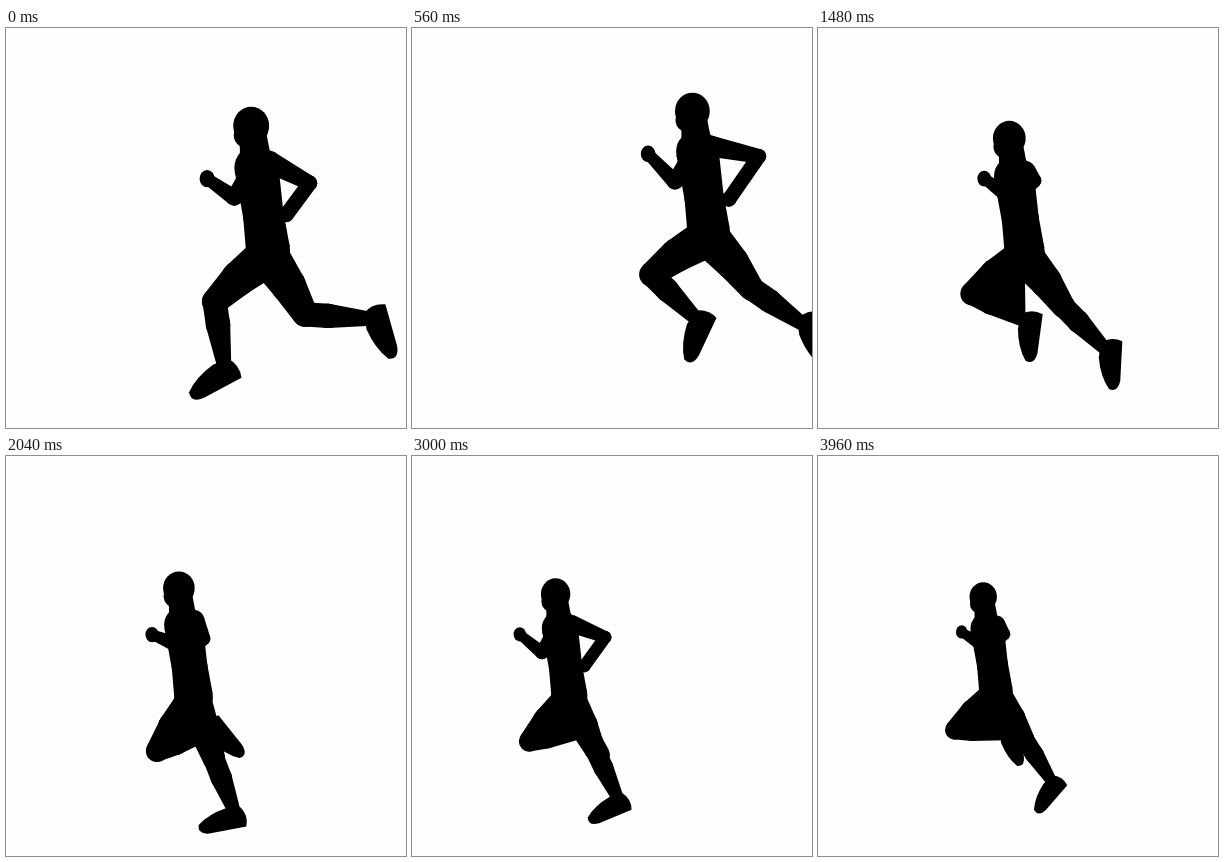
Recreate the animation shown at these times as an HTML page with a canvas. Size 400x400 px, loop 4000 ms.

```html
<!DOCTYPE html>
<html lang="en">
<head>
<meta charset="utf-8">
<title>Runner</title>
<style>
  html, body { margin: 0; width: 100%; height: 100%; overflow: hidden; background: #fefefc; }
  canvas { display: block; width: 100vw; height: 100vh; }
</style>
</head>
<body>
<canvas id="stage" width="400" height="400"></canvas>
<script>
const ctx = document.getElementById('stage').getContext('2d');
const LOOP = 4000, TICK = 40, STEP = 313;
const THIGH = 64, SHIN = 57;
const { sin, cos, PI } = Math;
const rad = deg => deg * PI / 180;
const bump = (u, mid, width) => Math.exp(-(((u - mid) / width) ** 2));

// Handheld camera: turning points of the hip as [time, x, mean y]
const sway = [
  [0, 262, 235], [600, 297, 211], [1300, 152, 225], [1640, 252, 228],
  [2300, 155, 229], [2540, 268, 235], [3200, 128, 230], [3960, 178, 232]
];

function hipAt(t) {
  const i = Math.max(1, sway.findIndex(k => k[0] >= t));
  const [t0, x0, y0] = sway[i - 1], [t1, x1, y1] = sway[i];
  const e = (1 - cos(PI * (t - t0) / (t1 - t0))) / 2;
  return [x0 + (x1 - x0) * e, y0 + (y1 - y0) * e];
}

// Angles in degrees from straight down, forward positive.
// u runs from 0 (landing) over 1 (the other foot lands) to 2.
const thighAngle = u => 8 + 45 * cos(PI * (u - 1.68));

function shinAngle(u) {
  const a = PI * u;
  return -56.5 + 47.3 * cos(a) + 21.6 * sin(a) + 2.7 * cos(2 * a) -
    9.7 * sin(2 * a) - 4 * cos(3 * a) - 6.4 * sin(3 * a);
}

// Flat while the foot carries weight, pointed at push-off
const footAngle = u =>
  18 - shinAngle(u) - 30 * bump(u, 0.38, 0.13) + 30 * bump(u, 0.63, 0.1);

const swing = ([x, y], length, deg) =>
  [x - length * sin(rad(deg)), y + length * cos(rad(deg))];
const mix = (a, b, k) => a.map((v, i) => v + (b[i] - v) * k);

function disc([x, y], rx, ry = rx) {
  ctx.beginPath();
  ctx.ellipse(x, y, rx, ry, 0, 0, 2 * PI);
  ctx.fill();
}

// Tapered limb between two round ends
function limb(p, r1, q, r2) {
  disc(p, r1);
  disc(q, r2);
  const dx = q[0] - p[0], dy = q[1] - p[1], d = Math.hypot(dx, dy);
  if (d <= Math.abs(r1 - r2)) return;
  const a = Math.atan2(dy, dx), b = Math.acos((r1 - r2) / d);
  const at = ([x, y], r, g) => ctx.lineTo(x + r * cos(g), y + r * sin(g));
  ctx.beginPath();
  at(p, r1, a + b);
  at(q, r2, a + b);
  at(q, r2, a - b);
  at(p, r1, a - b);
  ctx.fill();
}

function drawFoot(ankle, deg) {
  ctx.save();
  ctx.translate(...ankle);
  ctx.scale(-1, 1);
  ctx.rotate(rad(deg));
  ctx.beginPath();
  ctx.moveTo(-6, -5);
  ctx.quadraticCurveTo(-13, 4, -9, 15);
  ctx.lineTo(28, 16);
  ctx.quadraticCurveTo(40, 15, 37, 6);
  ctx.quadraticCurveTo(26, -3, 8, -6);
  ctx.fill();
  ctx.restore();
}

function drawLeg(u) {
  const hip = [0, 0], a = thighAngle(u), b = shinAngle(u);
  const knee = swing(hip, THIGH, a), ankle = swing(knee, SHIN, b);
  const mid = mix(hip, knee, 0.55), calf = mix(knee, ankle, 0.35);
  limb([0, 5], 18, mid, 15);
  limb(mid, 15, knee, 11);
  limb(knee, 10.5, calf, 10.5);
  limb(calf, 10.5, ankle, 6);
  drawFoot(ankle, footAngle(u));
  if (a - b > 110) {   // folded leg closes up
    ctx.beginPath();
    for (const p of [hip, knee, ankle]) ctx.lineTo(...p);
    ctx.fill();
  }
}

function drawBody(p) {
  const c = cos(PI * (p - 0.66)), d = cos(2 * PI * (p - 0.62));
  const head = [-14.5, -107], chest = [-10, -71], waist = [-4, -30];
  disc(head, 15.5, 16.5);
  disc([head[0] - 4, head[1] + 8], 11);
  limb([-13, -100], 11.5, chest, 14);
  limb(chest, 19, waist, 17.5);
  limb(waist, 17.5, [0, 0], 19);

  const nearElbow = [21 + 18 * c + 6 * d, -57 - 10 * d];
  const nearHand = [7 + 11 * c, -41 + 13 * c];
  limb([1, -76], 9.5, nearElbow, 6.5);
  limb(nearElbow, 6.5, nearHand, 6.5);

  const farElbow = [-25 - 5 * c, -50 + 6 * c];
  const farHand = [-46 - 8 * c, -61 - 8 * d];
  limb(chest, 11, farElbow, 7);
  limb(farElbow, 7, farHand, 5);
  disc(farHand, 6.5, 7.5);
}

function draw(t) {
  const p = 0.86 + t / STEP;          // one unit is one footfall
  const s = 1.16 - 0.00007 * t;       // slowly running away
  const [x, y] = hipAt(t), bob = -14 * cos(2 * PI * (p - 0.8));
  ctx.setTransform(1, 0, 0, 1, 0, 0);
  ctx.fillStyle = '#fefefc';
  ctx.fillRect(0, 0, 400, 400);
  ctx.setTransform(s, 0, 0, s, x, y + bob);
  ctx.fillStyle = '#000';
  drawLeg(p % 2);
  drawLeg((p + 1) % 2);
  drawBody(p);
}

const start = performance.now();
function frame() {
  const t = (performance.now() - start) % LOOP;
  draw(Math.floor(t / TICK) * TICK);
  requestAnimationFrame(frame);
}
frame();
</script>
</body>
</html>
```
